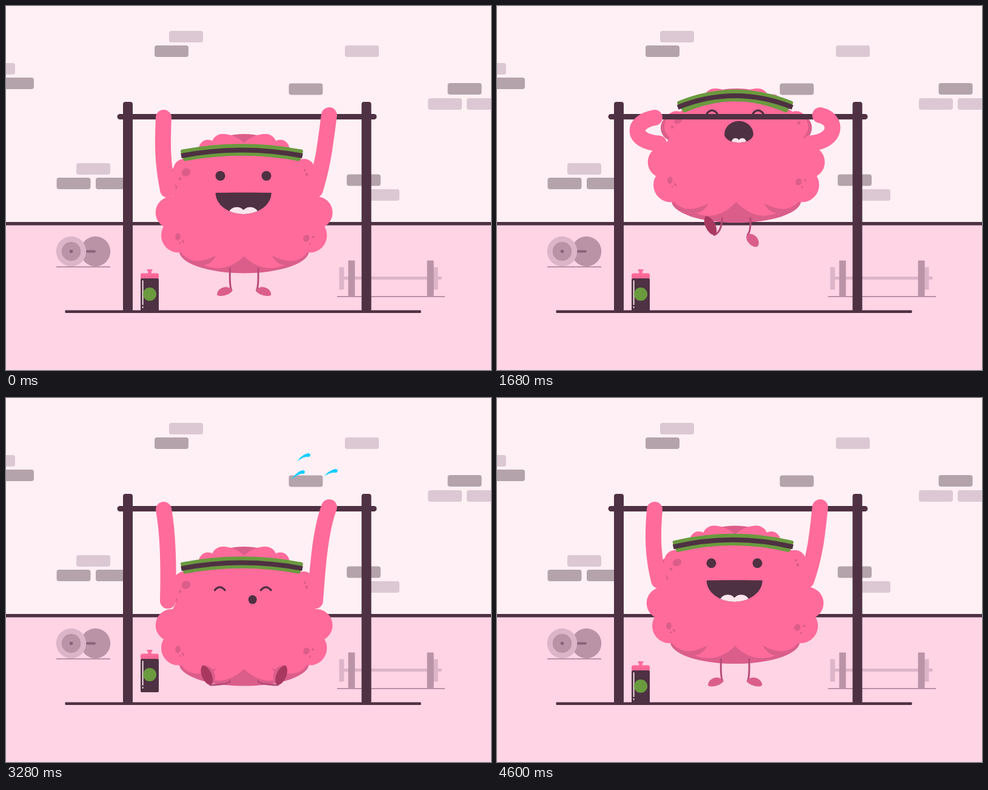
Animation of 800x600 px, one loop 4640 ms. Source, as an HTML page with a canvas:

```html
<!DOCTYPE html>
<html lang="en">
<head>
<meta charset="utf-8">
<title>Pull-ups</title>
<style>
html, body { margin: 0; width: 100%; height: 100%; overflow: hidden; background: #fff0f5; }
canvas { display: block; width: 800px; height: 600px; }
</style>
</head>
<body>
<canvas id="stage" width="800" height="600"></canvas>
<script>
const ctx = document.getElementById('stage').getContext('2d');
const LOOP = 4640, STEP = 40, AXIS = 392.7, GRAVITY = .00156;
const PINK = '#ff6b9b', SHADE = '#db5e8a', DARK = '#4e3142', GREEN = '#6b9a3f';
const MAUVE = '#ba93a6', PALE = '#ddb5c9', CYAN = '#14cfff', LEG = '#b64b77';

// Mouth poses: offset x, y, half width, upper height, lower height, tongue
const SMILE = [0, 308, 46, 0, 35, 1], SHOUT = [3, 322, 22, 28, 28, 1];
const GASP = [0, 324, 33, 30, 17, 1], OOH = [15, 298, 7, 7, 7.5, 0];

// Foot poses: ankle x, ankle y, direction in degrees, sole showing
const STAND = [373, 469, 164, 0], HANG = [379, 457, 88, 0];
const KICK = [357, 467, 247, 1], TUCK = [338, 439, 247, 1];

const mix = (a, b, k) => a + (b - a) * k;
const mixAll = (a, b, k) => a.map((v, i) => mix(v, b[i], k));
const clamp = k => Math.min(1, Math.max(0, k));

function ramp(t, from, to) {
  const k = clamp((t - from) / (to - from));
  return k * k * (3 - 2 * k);
}
const hold = (t, a, b, c, d) => ramp(t, a, b) - ramp(t, c, d);
const bell = (t, center, width) => Math.max(0, 1 - ((t - center) / width) ** 2) ** 2;

// One short failed pull, one long strained pull, then a drop that bounces out.
function bodyPose(t) {
  const first = hold(t, 280, 600, 640, 860), second = hold(t, 900, 1190, 2840, 3180);
  const lift = 57 * first + (77 + (t - 1320) * .0171) * second;
  const since = t - 3260;
  const bounce = 36 * ramp(t, 2900, 3240) * Math.exp(-Math.max(0, since) / 505) * Math.cos(since / 720 * 2 * Math.PI);
  const sag = 12 * (bell(t, 220, 220) + bell(t, 880, 200));
  const recoil = bell(t, 4450, 260);
  return {
    x: 2 * second,
    y: sag + bounce - lift - 9 * recoil,
    pitch: .4 * sag - .27 * lift + 19 * bell(t, 4000, 450) - 12 * recoil
  };
}

function mouthPose(t, pitch) {
  let pose = mixAll(SMILE, SHOUT, ramp(t, 280, 520));
  pose = mixAll(pose, GASP, ramp(t, 680, 1160));
  pose = mixAll(pose, OOH, ramp(t, 1600, 1800));
  pose = mixAll(pose, SMILE, ramp(t, 3440, 3640));
  pose[1] += .9 * pitch;
  return pose;
}

function rect(color, x, y, w, h, r = 0) {
  ctx.fillStyle = color;
  ctx.beginPath();
  ctx.roundRect(x, y, w, h, r);
  ctx.fill();
}

function oval(color, x, y, rx, ry = rx, turn = 0) {
  ctx.fillStyle = color;
  ctx.beginPath();
  ctx.ellipse(x, y, rx, ry, turn, 0, 7);
  ctx.fill();
}

function shape(color, d) {
  ctx.fillStyle = color;
  ctx.fill(new Path2D(d));
}

function line(color, width, d, cap = 'round') {
  ctx.strokeStyle = color;
  ctx.lineWidth = width;
  ctx.lineCap = cap;
  ctx.lineJoin = 'round';
  ctx.stroke(new Path2D(d));
}

function bothSides(draw) {
  for (const side of [1, -1]) {
    ctx.save();
    if (side < 0) { ctx.translate(2 * AXIS, 0); ctx.scale(-1, 1); }
    draw(side);
    ctx.restore();
  }
}

function drawRoom() {
  rect('#fff0f5', 0, 0, 800, 600);
  rect('#ffd4e5', 0, 358, 800, 242);
  const brick = color => ([x, y]) => rect(color, x, y, 56, 19, 4);
  [[269, 41], [559, 65], [-41, 94], [696, 152], [760, 152], [116, 259], [593, 302]].forEach(brick('#dcc8d3'));
  [[245, 65], [-10, 118], [466.5, 127.5], [728.5, 127], [83.5, 283], [148, 283], [562, 277.5]].forEach(brick('#b5a3ab'));
  rect(DARK, 0, 356, 800, 5.5);

  oval(MAUVE, 147.5, 404.5, 24.7);
  rect('#8e6278', 130, 402.5, 18, 4, 2);
  oval(PALE, 107.5, 404.5, 24.7);
  oval(MAUVE, 107.5, 404.5, 15.7);
  oval('#8e6278', 107.5, 404.5, 2.8);
  rect(MAUVE, 83, 429, 89, 2);

  rect(PALE, 552, 446, 167, 5, 2.5);
  for (const side of [-1, 1]) {
    rect(PALE, 631 + side * 73.5, 430.5, side * 8, 37);
    rect(MAUVE, 629.5 + side * 65, 419.5, 11, 59.5);
  }
  rect(MAUVE, 546, 478, 178, 2);
}

function drawFrame() {
  rect(DARK, 193, 158, 16, 346, 4);
  rect(DARK, 586.5, 158, 16, 346, 4);
  rect(DARK, 97.5, 501.5, 587, 4.5, 1);
  rect(DARK, 183.5, 178, 428, 9, 4.5);
}

function drawBottle(t) {
  const since = Math.max(0, t - 3460);
  const tilt = .09 * Math.exp(-since / 700) * Math.sin(since / 240 * 2 * Math.PI) * (1 - ramp(t, 4050, 4400));
  ctx.save();
  ctx.translate(237, 503 - 19 * bell(t, 3280, 180));
  ctx.rotate(tilt);
  rect(PINK, -4.5, -69, 9, 3, 1);
  rect(PINK, -2.8, -67, 5.6, 8);
  rect(PINK, -15, -62.5, 30, 10, 3);
  for (let x = -12; x <= 12; x += 4) rect(SHADE, x - .5, -59, 1, 5);
  rect(DARK, -15, -54, 30, 55, 2);
  rect('#ffe9f1', -12.3, -51, 1.8, 41, .9);
  rect('#ffe9f1', -12.3, -8, 1.8, 3, .9);
  oval(GREEN, 0, -28, 11);
  ctx.restore();
}

// A drop flies on a parabola through its highest point, 250 ms after the start.
function drawDrop(age, x, y, speed) {
  if (age < 50 || age > 480) return;
  const size = Math.min(1, age / 100, (510 - age) / 110);
  const pace = Math.hypot(speed, 2 * GRAVITY * (age - 250));
  const lag = Math.min(age * .5, 19 * size / pace);
  for (let k = 0; k <= 1; k += .05) {
    const s = age - 250 - lag * (1 - k);
    oval(CYAN, x + speed * s, y + GRAVITY * s * s, mix(.5, 3 * size, k));
  }
}

function drawSweat(t) {
  for (const start of [500, 1660, 2400, 3030]) {
    drawDrop(t - start, 500, 94, .24);
    drawDrop(t - start, 491, 122, .22);
    drawDrop(t - start, 545, 120, .27);
  }
  for (const start of [870, 1830, 2560]) {
    drawDrop(t - start, 195, 133, -.1);
    drawDrop(t - start, 250, 100, -.21);
    drawDrop(t - start, 255, 121, -.17);
  }
}

function drawBrain(pitch) {
  const down = Math.max(pitch, 0), up = Math.min(pitch, 0);
  const top = -.36 * up + .15 * down, cusp = .3 * pitch, edge = .12 * up + .2 * down;
  oval(SHADE, AXIS, 404, 107, 36.5);
  oval(SHADE, AXIS, 223 + top, 40, 12);
  bothSides(() => {
    oval(SHADE, 290, 284, 22);
    oval(PINK, 296, 280 - .1 * up, 22);
    oval(PINK, 294, 270 - .2 * up, 18);
    oval(PINK, 273.2, 340.5, 26.5);
    oval(PINK, 284.5, 378, 28.5);
    oval(PINK, 357, 229 + top, 18);
    oval(PINK, 333, 235.5 + top, 15);
    shape(PINK, `M357 ${211 + top}Q378 ${211 + top} 394 ${227 + top + down * .4}V300H340Z`);
    shape(PINK, `M394 238L320 ${238 + top}L294 ${256 - .2 * up}L282 300L262 340L275 395L286 ${403 + edge}Q306 ${433 + edge} 347 ${411 + edge}L394 ${410 + cusp}Z`);
    shape(PINK, `M347 ${411 + edge}Q338 ${427 + edge} 326 ${427 + edge}Q362 ${442 + edge} 393.5 ${412 + cusp}V380H347Z`);
  });

  const high = .1 * up + .75 * down, deep = .45 * pitch;
  oval(SHADE, 297, 274 + high, 7.5, 6.5 + up * .08, -.5);
  oval(SHADE, 287, 285 + high, 2.4);
  oval(SHADE, 493, 270.5 + high, 2);
  oval(SHADE, 496, 278 + high, 2.2, 3, -.4);
  oval(SHADE, 283.5, 380.5 + deep, 4.2, 6, .1);
  oval(SHADE, 287, 391 + deep, 1.6);
  oval(SHADE, 292, 388 + deep, 1.6, 3, -.5);
  oval(SHADE, 495.5, 383 + deep, 5, 5.8, .5);
  oval(SHADE, 506.5, 380.5 + deep, 2);
  oval(SHADE, 501.5, 392 + deep, 1.6);
}

function drawBand(pitch) {
  const down = Math.max(pitch, 0), up = Math.min(pitch, 0);
  const mid = 237 + .28 * up + 1.4 * down, end = 246 - .14 * up + .65 * down;
  const half = 98 + .24 * up + .37 * down, ctrl = 2 * mid - end, slant = (end - mid) * .5;
  const x = 389 - .08 * up, left = x - half, right = x + half;
  const band = `M${left} ${end - 6.5}Q${x} ${ctrl - 7} ${right} ${end - 6.5}L${right - slant} ${end + 6.5}Q${x} ${ctrl + 7} ${left + slant} ${end + 6.5}Z`;
  shape(GREEN, band);
  line(GREEN, 6, band);
  line(DARK, 8, `M${left - 2} ${end + 1}Q${x} ${ctrl} ${right + 2} ${end + 1}`, 'butt');
}

function drawFace(t, pitch) {
  const closed = t >= 320 && t < 3600;
  for (const x of [353.5, 429.5]) {
    const y = 280 + pitch;
    if (closed) line(DARK, 3.4, `M${x - 9} ${y + 2.5}Q${x - 1} ${y - 7} ${x + 7.5} ${y + 2.5}`);
    else oval(DARK, x, y, 8);
  }
  const [dx, y, half, upper, lower, tongue] = mouthPose(t, pitch);
  const x = 391.7 + dx;
  ctx.save();
  ctx.beginPath();
  ctx.ellipse(x, y, half, Math.max(upper, .5), 0, Math.PI, 2 * Math.PI);
  ctx.ellipse(x, y, half, lower, 0, 0, Math.PI);
  ctx.fillStyle = DARK;
  ctx.fill();
  ctx.clip();
  const w = Math.min(23, half * .75) * tongue;
  for (const side of [-1, 1]) oval('#fbe6ee', x + side * w * .48, y + lower, w * .58, 11.5 * tongue);
  ctx.restore();
}

function drawLegs(t) {
  const effort = hold(t, 300, 450, 700, 850) + hold(t, 1000, 1140, 2820, 2980);
  const tuck = hold(t, 3000, 3200, 3400, 3600);
  const hang = hold(t, 1400, 2000, 4080, 4380);
  const beat = t < 900 ? -Math.cos((t - 600) / 190 * Math.PI) : Math.cos((t - 1320) / 190 * Math.PI);
  const base = mixAll(STAND, HANG, hang);
  bothSides(side => {
    const kick = effort * (.5 + .5 * side * beat);
    const pose = mixAll(mixAll(base, KICK, kick), TUCK, tuck);
    const [x, , angle, sole] = pose;
    const y = pose[1] - 6 * effort * (1 - kick) * (1 - hang) - 14 * hang * kick;
    const rad = angle * Math.PI / 180, length = 26 + 9 * sole;
    const wide = 9 - sole, under = 3 + 6 * Math.abs(Math.sin(rad));
    line(LEG, 3, `M369.5 433Q368.5 ${mix(433, y, .8)} ${x - 1} ${y}`);
    const foot = (u, l) => `M0 0C${length * .1} ${u * 1.3} ${length * .85} ${u * 1.4} ${length} 0C${length * .85} ${-l * 1.3} ${length * .1} ${-l * 1.2} 0 0Z`;
    ctx.save();
    ctx.translate(x, y);
    ctx.rotate(rad);
    shape(SHADE, foot(wide + 5 * tuck, under));
    ctx.globalAlpha = sole;
    shape('#a8385f', foot(wide, under));
    ctx.restore();
  });
}

// The elbow bows outward (side) as the body rises; lean pulls the whole arm inward.
function drawArm(x, y, side, lean, height) {
  const bend = clamp(-height / 57), shoulder = 303 + .92 * height;
  const bow = mix(2, 39, bend) - .3 * Math.max(height, 0);
  const x1 = x + side * (bow - lean), x2 = x + side * (bow - 1.4 * lean);
  const end = x - side * (7 + lean * mix(2, 1.2, bend));
  line(PINK, 26, `M${x} ${y}C${x1} ${mix(y + 44, y + 7, bend)} ${x2} ${shoulder - mix(45, 3, bend)} ${end} ${shoulder}`);
}

function draw(t) {
  const body = bodyPose(t);
  drawRoom();
  drawSweat(t);
  ctx.save();
  ctx.translate(body.x, body.y);
  drawBrain(body.pitch);
  drawBand(body.pitch);
  drawFace(t, body.pitch);
  drawLegs(t);
  ctx.restore();
  drawFrame();
  drawBottle(t);
  drawArm(260, 184, -1, 0, body.y);
  drawArm(533, 180, 1, 8, body.y);
}

const begin = performance.now();
function tick() {
  const t = (performance.now() - begin) % LOOP;
  draw(Math.floor(t / STEP) * STEP);
  requestAnimationFrame(tick);
}
tick();
</script>
</body>
</html>
```
